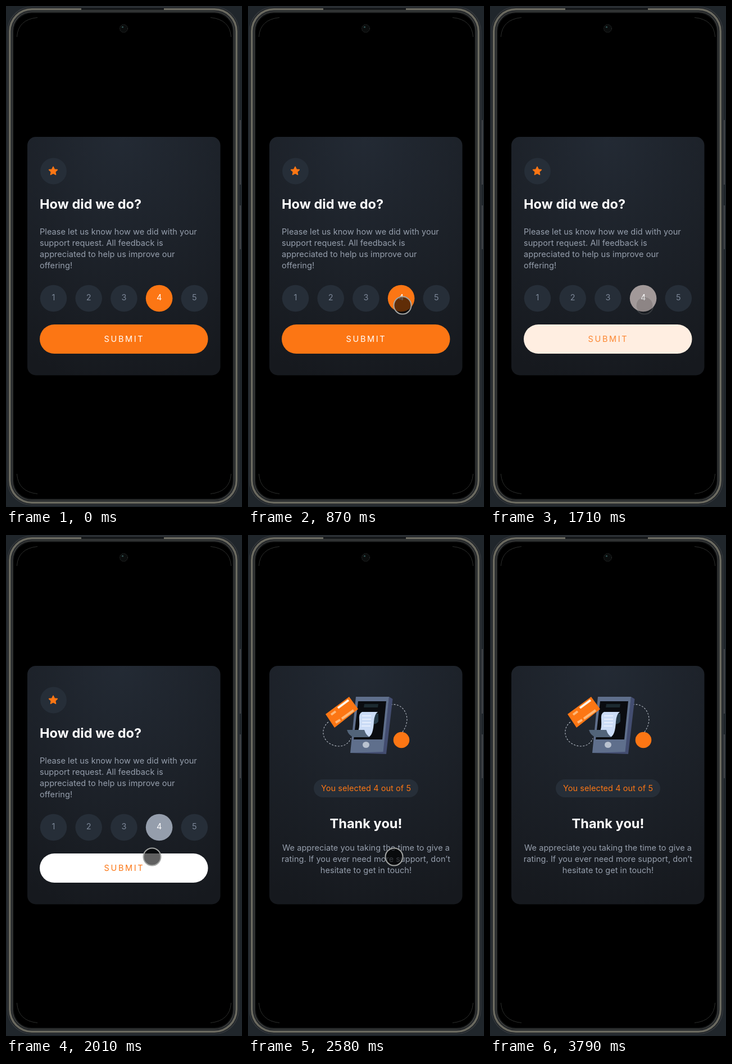
Recreate the animation shown at these times as an HTML page. Size 420 by 892 pixels, loop 5.02 s.

```html
<!DOCTYPE html>
<html lang="en">
<head>
<meta charset="utf-8">
<title>Rating card</title>
<style>
  html, body { margin: 0; height: 100%; overflow: hidden; background: #20262b; }
  svg { display: block; width: 100vw; height: 100vh; }
  text { font: 14.5px Inter, sans-serif; letter-spacing: .06px; fill: #969fad; }
  .title { font-weight: 700; font-size: 23.5px; fill: #fff; }
  .mid { text-anchor: middle; }
  #submitText { letter-spacing: 2.65px; }
  .line { fill: none; }
</style>
</head>
<body>
<svg viewBox="0 0 420 892">
  <defs>
    <radialGradient id="cardFill" cx=".5" cy="0" r="1.05">
      <stop offset="0" stop-color="#232a34"/>
      <stop offset="1" stop-color="#16191e"/>
    </radialGradient>
  </defs>

  <!-- phone body -->
  <rect width="420" height="892" fill="#20262b"/>
  <path d="M417 203V318M417 355V433" stroke="#44474b" stroke-width="2"/>
  <g id="bezel"></g>
  <path d="M134 5.500H281" stroke="#121417" stroke-width="3"/>
  <path class="line" stroke="#2c2e2c" d="M19.500 55V54Q22 24 56 20.500M400.500 55V54Q398 24 364 20.500M19.500 833V834Q22 865 56 868.500M400.500 833V834Q398 865 364 868.500"/>
  <circle cx="209.500" cy="40" r="7" fill="#0a0c0c" stroke="#2a2e2e" stroke-dasharray="2 1"/>
  <circle cx="207.500" cy="37.500" r="1.600" fill="#2f5050"/>

  <rect x="38" y="233" width="343.500" height="424.500" rx="15" fill="url(#cardFill)"/>

  <g id="rating">
    <circle cx="84.500" cy="294" r="23.500" fill="#262e38"/>
    <path id="star" fill="#fc7614" stroke="#fc7614" stroke-width="1.500" stroke-linejoin="round"/>
    <text class="title" x="60" y="361">How did we do?</text>
    <text x="60" y="407">Please let us know how we did with your</text>
    <text x="60" y="427">support request. All feedback is</text>
    <text x="60" y="447">appreciated to help us improve our</text>
    <text x="60" y="467">offering!</text>
    <g id="scores"></g>
    <rect id="submit" x="60" y="567" width="299.500" height="52" rx="26"/>
    <text id="submitText" x="174.500" y="598">SUBMIT</text>
  </g>

  <g id="thanks">
    <g class="line" stroke="#b4bac4" stroke-width="1.100" stroke-dasharray="3 2.500">
      <path d="M143 333C130 343 131 362 145 371S177 377 183 362"/>
      <path d="M254 302C270 299 283 312 283 329Q282 343 273 353"/>
    </g>
    <path fill="#434d70" d="M251 288L257.500 292L246 390L182 388L240 381Z"/>
    <path fill="#5f6f8c" d="M192 288H251L240.500 386L182 388Z"/>
    <path fill="#0a0c10" d="M196 296H246L239 364H188Z"/>
    <path fill="#1c2a30" d="M207 301H232L231 307H206Z"/>
    <path fill="#263a48" d="M221 318H232V332Q228 338 221 336Z"/>
    <path fill="#cbdcf6" d="M203 315H231Q225 319 224 332Q223 357 214 360L195 350Q199 346 198 329Q197 317 203 315Z"/>
    <path class="line" stroke="#eef4ff" stroke-width="1.500" d="M203 322H219M203 328H219M203 334H219M202 340H218"/>
    <path fill="#526479" d="M176 347H207Q210 357 217 360H188Q179 357 176 347Z"/>
    <ellipse cx="210" cy="373.500" rx="6" ry="5.500" fill="#b9c2d0"/>
    <path fill="#fc7614" d="M138 319L180 288L196 310L154 343Z"/>
    <g class="line" stroke-width="4">
      <path stroke="#fff6ea" d="M160 308L179 294"/>
      <path stroke="#ffb877" d="M148 320L156 314M167 327L188 312M156 334L164 329"/>
    </g>
    <circle cx="273" cy="365" r="14.300" fill="#fc7614"/>
    <rect x="117" y="435" width="186" height="32" rx="16" fill="#262e38"/>
    <text class="mid" x="210" y="456" style="fill:#fc7614">You selected 4 out of 5</text>
    <text class="title mid" x="210" y="522">Thank you!</text>
    <text class="mid" x="210" y="562">We appreciate you taking the time to give a</text>
    <text class="mid" x="210" y="582">rating. If you ever need more support, don’t</text>
    <text class="mid" x="210" y="602">hesitate to get in touch!</text>
  </g>

  <g id="taps"></g>
</svg>
<script>
const LOOP = 5020;
const $ = id => document.getElementById(id);
const progress = (t, from, to) => Math.min(1, Math.max(0, (t - from) / (to - from)));
const ease = p => p * p * (3 - 2 * p);
const mixColor = (a, b, p) => `rgb(${a.map((v, i) => Math.round(v + (b[i] - v) * p))})`;

const ORANGE = [252, 118, 20], WHITE = [255, 255, 255], GREY = [149, 158, 172];

// Each tap shows at once where the finger lands, then fades out.
const taps = [
  { x: 275, y: 533, down: 870, up: 1450, gone: 1780 },
  { x: 260, y: 573, down: 2010, up: 3400, gone: 3790 }
];

// Nested rounded outlines: inset from the body edge and colour.
$('bezel').innerHTML = [
  [0, '#34383c'], [1.5, '#1e2226'], [3, '#6b6a60'], [6.5, '#25282b'],
  [9, '#494a46'], [10, '#101214'], [12, '#000']
].map(([inset, color]) => `<rect x="${2 + inset}" y="${1 + inset}" width="${413 - 2 * inset}"
  height="${888 - 2 * inset}" rx="${44 - inset}" fill="${color}"/>`).join('');

$('star').setAttribute('d', 'M' + Array.from({ length: 10 }, (_, i) => {
  const angle = i * Math.PI / 5 - Math.PI / 2, r = i % 2 ? 3.8 : 7.8;
  return `${84 + r * Math.cos(angle)} ${294 + r * Math.sin(angle)}`;
}).join('L') + 'Z');

$('scores').innerHTML = [1, 2, 3, 4, 5].map(n => {
  const x = 84.5 + (n - 1) * 62.7;
  const [circleId, color] = n === 4 ? ['id="chosen"', '#fff'] : ['', '#7c8798'];
  return `<circle ${circleId} cx="${x}" cy="520.500" r="23.800" fill="#262e38"/>
    <text class="mid" x="${x}" y="523.500" style="fill:${color}">${n}</text>`;
}).join('');

$('taps').innerHTML = taps.map(({ x, y }) => `<g>
  <circle cx="${x}" cy="${y}" r="15" fill-opacity=".62"/>
  <circle class="line" cx="${x}" cy="${y}" r="15.500" stroke="#a3a5a3" stroke-width="2"/></g>`).join('');

function draw(t) {
  const thanked = t >= 2510;
  $('rating').style.display = thanked ? 'none' : '';
  $('thanks').style.display = thanked ? '' : 'none';

  const chosen = ease(progress(t, 1470, 1780));
  $('chosen').style.fill = mixColor(ORANGE, GREY, chosen);
  $('submit').style.fill = mixColor(ORANGE, WHITE, chosen);
  $('submitText').style.fill = mixColor(WHITE, ORANGE, chosen);

  taps.forEach(({ down, up, gone }, i) => {
    $('taps').children[i].style.opacity = t < down ? 0 : 1 - progress(t, up, gone);
  });
}

const start = performance.now();
function tick() {
  draw((performance.now() - start) % LOOP);
  requestAnimationFrame(tick);
}
tick();
</script>
</body>
</html>
```
